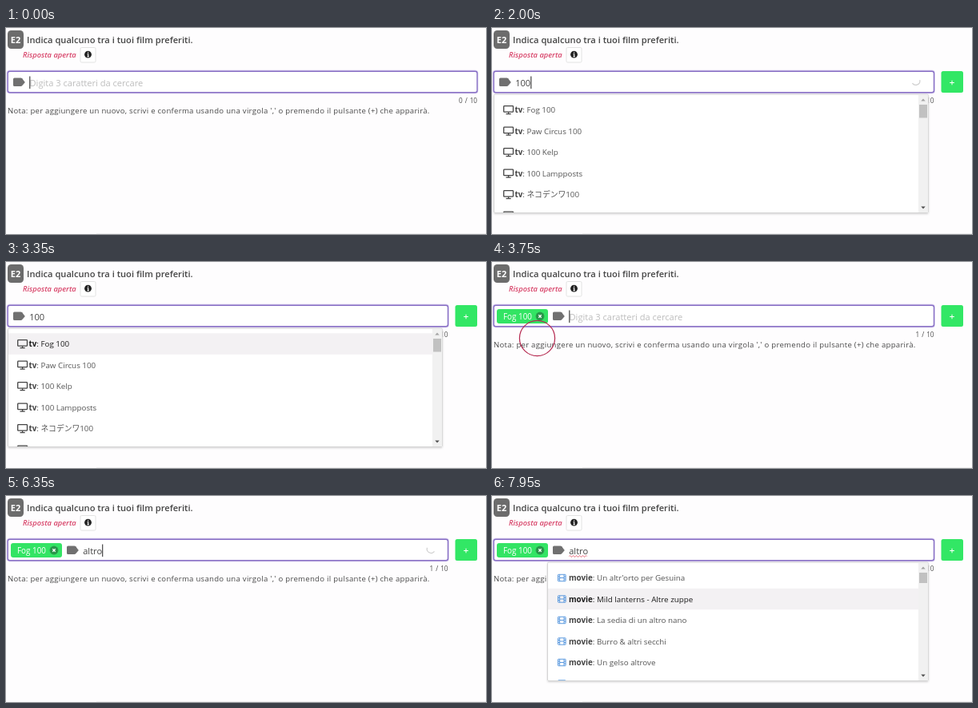
These frames come from a looping animation (600 by 258 pixels, 8 s). An HTML page:

```html
<!DOCTYPE html>
<html lang="it">
<head>
<meta charset="utf-8">
<title>Campo con suggerimenti</title>
<style>
  html, body { margin: 0; width: 100%; height: 100%; overflow: hidden; background: #fefdfe; }
  svg { display: block; width: 100%; height: 100%; }
  text { font-family: "Open Sans", "Noto Sans", "Noto Sans CJK JP", sans-serif; fill: #4a4a4a; white-space: pre; }
  .title { font-size: 11.15px; font-weight: 600; fill: #444; }
  .kind { font-size: 9.3px; font-weight: 600; font-style: italic; fill: #d8446a; }
  .note { font-size: 9.6px; letter-spacing: .265px; }
  .count { font-size: 8.2px; word-spacing: .8px; text-anchor: end; }
  .entry { font-size: 11.1px; fill: #444; }
  .hint { font-size: 11.1px; fill: #bdbdbd; }
  .chip { font-size: 9.9px; font-weight: 500; fill: #fff; }
  .row text { font-size: 9.8px; fill: #555; }
  .row tspan { font-weight: 700; fill: #444; }
  .row .lit, .row .lit tspan { fill: #1c1c1c; }
</style>
</head>
<body>
<svg viewBox="0 0 600 258">
  <defs>
    <filter id="shade" x="-5%" y="-5%" width="110%" height="115%">
      <feDropShadow dx="0" dy="1.2" stdDeviation="1.2" flood-opacity=".16"/>
    </filter>
    <clipPath id="listClip"><rect y="84" width="600" height="147"/></clipPath>
    <g id="tv" fill="none" stroke="#444" stroke-width="1.3">
      <rect x=".7" y="-4.9" width="11.8" height="7.6" rx=".8"/>
      <path d="M6.6 2.7V5M3.5 5.2H9.7"/>
    </g>
    <g id="film" fill="none" stroke="#4a8fdc" stroke-width=".9">
      <rect x=".5" y="-4.2" width="9.6" height="8.4" rx=".6"/>
      <path d="M2.6-4V4M8-4V4M2.6 0H8M.5-1.5H2.6M.5 1.5H2.6M8-1.5H10.1M8 1.5H10.1"/>
    </g>
  </defs>

  <rect width="600" height="258" fill="#fefdfe"/>
  <path d="M113 257.5H600" stroke="#f1f1f1"/>

  <rect x="2" y="3" width="20" height="23" rx="4.5" fill="#6c6c6c"/>
  <text x="12" y="19" text-anchor="middle" font-size="11" font-weight="700" style="fill:#fff">E2</text>
  <text class="title" x="26" y="19">Indica qualcuno tra i tuoi film preferiti.</text>
  <text class="kind" x="21" y="37">Risposta aperta</text>
  <rect x="93" y="24.5" width="19" height="18.5" rx="1.5" fill="#fff" stroke="#e2e2e2"/>
  <circle cx="102.5" cy="33.2" r="4.4" fill="#222"/>
  <path d="M102.6 30.2V31.5M101.6 32.8H102.7V35.7M101.4 35.8H103.9" stroke="#fff" stroke-width="1.1" fill="none"/>

  <rect id="glow" x="2" y="54" height="27" rx="2.5" fill="none" stroke="#e2daf4" stroke-width="2.8"/>
  <rect id="field" x="2.2" y="54.2" height="26.6" rx="2.5" fill="#fff" stroke="#866dc4" stroke-width="1.4"/>
  <g id="add">
    <rect x="561.5" y="54" width="27.5" height="27" rx="2.5" fill="#32e765"/>
    <path d="M572.2 68.5H577.8M575 65.7V71.3" stroke="#fff"/>
  </g>
  <text class="count" id="count" y="94"></text>
  <text class="note" x="2" y="106.5">Nota: per aggiungere un nuovo, scrivi e conferma usando una virgola ',' o premendo il pulsante (+) che apparirà.</text>

  <g id="chip">
    <rect x="6" y="59" width="64" height="18" rx="3" fill="#33e464"/>
    <text class="chip" x="14" y="72">Fog 100</text>
    <circle cx="60" cy="68" r="5.4" fill="#29964a"/>
    <path d="M58.3 66.3L61.7 69.7M61.7 66.3L58.3 69.7" stroke="#fff" stroke-width="1.3"/>
  </g>
  <g id="editor">
    <path d="M10.5 62.5H18.5Q19.5 62.5 20.2 63.3L23.8 68L20.2 72.3Q19.5 73 18.5 73H10.5Q9 73 9 71.5V64Q9 62.5 10.5 62.5Z" fill="#707070"/>
    <text class="hint" id="hint" x="29.5" y="72.5">Digita 3 caratteri da cercare</text>
    <text class="entry" id="entry" x="29.2" y="72.5"></text>
    <path id="squiggle" d="M29.5 75.5q1-1.8 2 0t2 0 2 0 2 0 2 0 2 0 2 0 2 0 2 0 2 0 2 0" fill="none" stroke="#e0455a" stroke-width=".9"/>
    <path id="caret" d="M29.8 60.5V76" stroke="#333" stroke-width="1.1"/>
  </g>
  <path id="spinner" d="M0-5.2A5.2 5.2 0 0 0 2 4.8" fill="none" stroke="#cfcfcf" stroke-width="1.2"/>
  <g id="lists"></g>
  <circle id="ripple" cx="56.5" cy="95.5" fill="none" stroke="#b5284f" stroke-width="1.2"/>
</svg>
<script>
const LOOP = 8000, BLINK = 524;
const $ = id => document.getElementById(id);
const show = (el, on) => el.setAttribute('visibility', on ? 'visible' : 'hidden');
const ramp = (t, from, to) => Math.min(1, Math.max(0, (t - from) / (to - from)));

function buildList(left, icon, kind, iconX, labelX, thumb, names) {
  const rows = names.map((name, i) => {
    const y = 102.5 + i * 26.5;
    return `<g class="row">
      <rect x="${left + .5}" y="${y - 13.2}" width="${533 - left}" height="26.5" fill="#f3f1f3" opacity="0"/>
      <use href="#${icon}" x="${iconX}" y="${y}"/>
      <text x="${labelX}" y="${y + 3.7}"><tspan>${kind}</tspan>: ${name}</text></g>`;
  }).join('');
  const group = document.createElementNS('http://www.w3.org/2000/svg', 'g');
  group.innerHTML = `
    <rect x="${left}" y="83" width="${545.3 - left}" height="148.5" rx="1.5" fill="#fff" stroke="#d4d4d4" filter="url(#shade)"/>
    <g clip-path="url(#listClip)">${rows}</g>
    <rect x="533" y="84" width="12" height="147" fill="#f1f1f1"/>
    <rect x="534" y="96" width="10" height="${thumb}" fill="#c1c1c1"/>
    <path d="M536.3 91.5L539 88.5L541.7 91.5Z" fill="#a3a3a3"/>
    <path d="M536.3 223.5L539 226.5L541.7 223.5Z" fill="#505050"/>`;
  $('lists').append(group);
  return group;
}

const shows = buildList(2.5, 'tv', 'tv', 14, 28.5, 16.5,
  ['Fog 100', 'Paw Circus 100', '100 Kelp', '100 Lampposts', 'ネコデンワ100', '100 Teapots']);
const movies = buildList(69.5, 'film', 'movie', 82, 96, 13,
  ["Un altr'orto per Gesuina", 'Mild lanterns - Altre zuppe', 'La sedia di un altro nano',
   'Burro &amp; altri secchi', 'Un gelso altrove', 'Altre due teiere']);

// Each edit restarts the caret blink.
const PICKED = 3700;
const edits = [[0, ''], [450, '1'], [727, '10'], [850, '100'], [PICKED, ''],
  [5850, 'a'], [5950, 'al'], [6000, 'alt'], [6100, 'altr'], [6175, 'altro']];

function caretOn(t, since) {
  const from = since === 850 ? 727 : since;
  return Math.floor((t - from) / BLINK) % 2 === 0;
}

function hover(list, index, amount) {
  const [shade, , label] = list.querySelectorAll('.row')[index].children;
  shade.setAttribute('opacity', amount);
  label.classList.toggle('lit', amount > .5);
}

function draw(t) {
  const [since, typed] = edits.filter(e => e[0] <= t).pop();
  const picked = t >= PICKED, narrow = t >= 450;
  const right = narrow ? 552.5 : 589;
  $('field').setAttribute('width', right - 2.2);
  $('glow').setAttribute('width', right - 2);
  $('count').setAttribute('x', right);
  $('count').textContent = (picked ? 1 : 0) + ' / 10';
  show($('add'), narrow);
  show($('chip'), picked);
  $('editor').setAttribute('transform', `translate(${picked ? 67 : 0})`);
  $('entry').textContent = typed;
  show($('hint'), !typed);
  const advance = typed ? $('entry').getComputedTextLength() : 0;
  $('caret').setAttribute('transform', `translate(${advance})`);
  show($('caret'), caretOn(t, since));
  show($('squiggle'), t >= 6900);

  show($('spinner'), (t >= 1250 && t < 2650) || (t >= 6350 && t < 6550));
  $('spinner').setAttribute('transform', `translate(530.5 68) rotate(${(t - 1250) / 1050 * 360})`);

  show(shows, t >= 1700 && t < PICKED);
  show(movies, t >= 6550);
  hover(shows, 0, ramp(t, 2480, 2630));
  const next = ramp(t, 7740, 7900);
  hover(movies, 0, ramp(t, 7240, 7390) * (1 - next));
  hover(movies, 1, next);

  show($('ripple'), t >= 3550 && t < 3850);
  $('ripple').setAttribute('r', Math.max(0, 22 * (t - 3500) / 250));
}

const start = performance.now();
function tick() {
  draw((performance.now() - start) % LOOP);
  requestAnimationFrame(tick);
}
tick();
</script>
</body>
</html>
```
